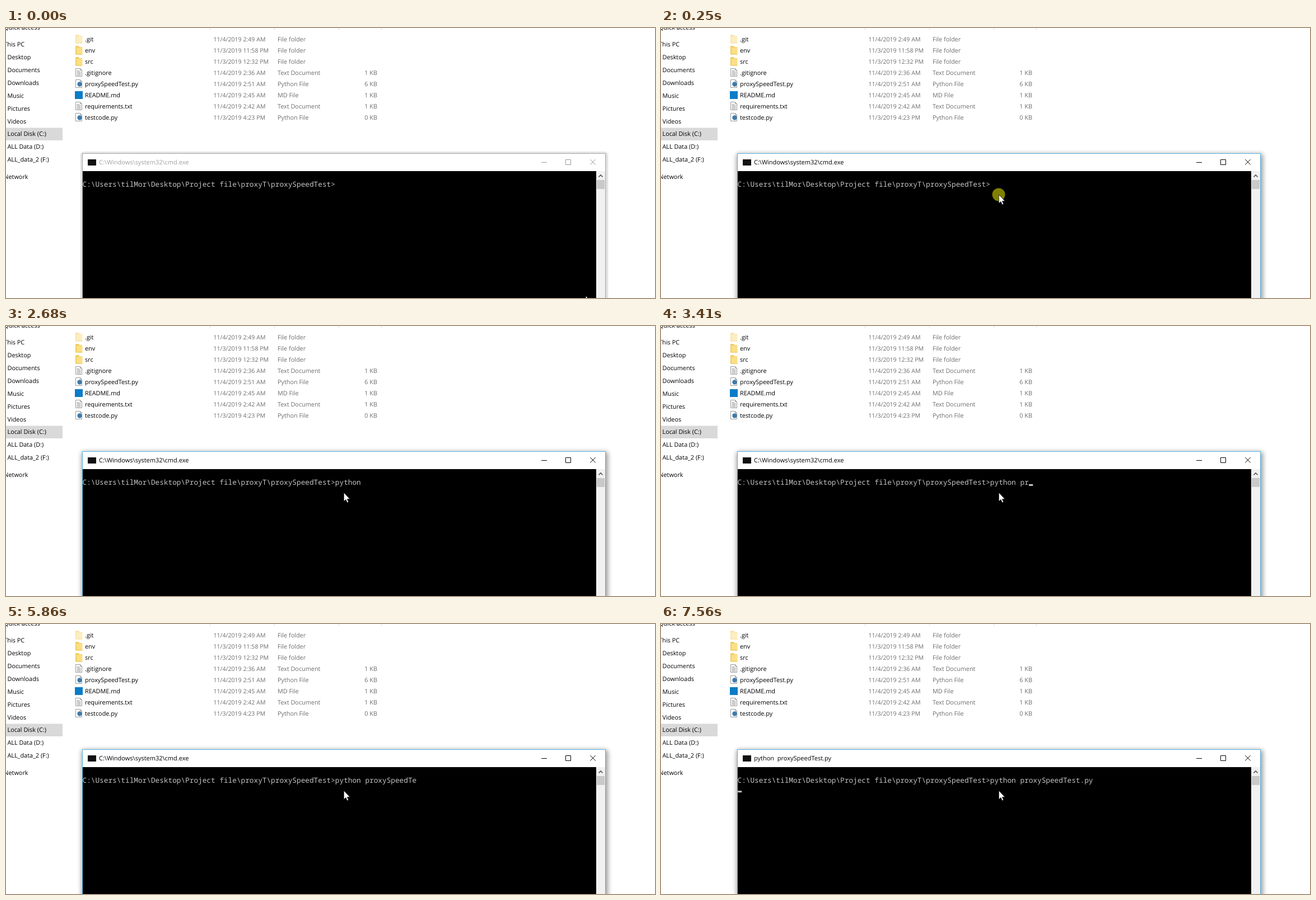
Recreate the animation shown at these times as an HTML page. Size 1159 px wide and 483 px high, loop 8000 ms.

```html
<!DOCTYPE html>
<html lang="en">
<head>
<meta charset="utf-8">
<title>Command window</title>
<style>
  html, body { margin: 0; width: 100%; height: 100%; overflow: hidden; background: #fff; }
  svg { display: block; }
  text { font: 10.85px "Open Sans", sans-serif; white-space: pre; text-rendering: geometricPrecision; }
  .date { font-size: 10.6px; }
  .title { font-size: 11px; }
  .mono { font: 12.75px "Noto Sans Mono", monospace; fill: #c4c4c4; }
</style>
</head>
<body>
<svg id="stage" width="1159" height="483" viewBox="0 0 1159 483">
  <defs>
    <g id="folder">
      <path d="M0 0H6L7 2H12V15H0Z" fill="#f0cd63"/>
      <path d="M2 3H12.5V15.500H2Z" fill="#fbdf85"/>
      <path d="M0 14.500H12.500V15.500H0Z" fill="#e8c255"/>
    </g>
    <g id="page">
      <path d="M.5 .5H8.500L11.500 3.500V14.500H.5Z" fill="#fff" stroke="#9a9a9a"/>
      <path d="M8.500 .5V3.500H11.500" fill="none" stroke="#9a9a9a"/>
    </g>
    <g id="doc">
      <use href="#page"/>
      <path d="M2.500 4.500H7M2.500 6.500H9.500M2.500 8.500H9.500M2.500 10.500H9.500M2.500 12.500H9.500" stroke="#9c9c9c"/>
    </g>
    <g id="script">
      <use href="#page"/>
      <circle cx="7.500" cy="8.500" r="4.200" fill="#3d7aab"/>
    </g>
    <rect id="note" x="-1" y="1" width="14" height="14" fill="#0a7cc8"/>
  </defs>

  <rect width="1159" height="483" fill="#fff"/>
  <path d="M364.500 0V4M479.500 0V4M594.500 0V4M670.500 0V4" stroke="#e2e2e2"/>
  <rect y="178.500" width="101" height="22.500" fill="#d9d9d9"/>
  <g id="nav"></g>
  <g id="files"></g>

  <rect id="shadow"/>
  <rect id="frame" x="136.500" y="224.500" width="934" height="270" fill="#fff"/>
  <rect x="137" y="256" width="917" height="227" fill="#000"/>
  <rect x="1054" y="256" width="16" height="227" fill="#f1f1f1"/>
  <rect x="1055" y="272" width="14" height="16" fill="#c9c9c9"/>
  <path d="M1058.500 266.500L1062 263L1065.500 266.500" fill="none" stroke="#555" stroke-width="1.600"/>
  <rect x="146" y="235" width="15" height="11" fill="#111"/>
  <text id="title" class="title" x="166" y="244.300"></text>
  <path id="buttons" d="M956 240.500H966M999.500 235.500H1008.500V244.500H999.500ZM1043.200 235L1052.800 244.600M1052.800 235L1043.200 244.600" fill="none"/>

  <text id="line" class="mono" x="136.500" y="283.500"></text>
  <rect id="caret" width="7.400" height="3" fill="#c4c4c4"/>
  <g id="mouse">
    <circle id="halo" r="11.500" fill="#808000"/>
    <path d="M.3 0V15.800L3.900 12.500L6.200 18L8.700 17L6.400 11.700H11.200Z" fill="#fff" stroke="#000" stroke-width=".7"/>
  </g>
</svg>
<script>
const LOOP = 8000;
const PROMPT = 'C:\\Users\\tilMor\\Desktop\\Project file\\proxyT\\proxySpeedTest>';
const COMMAND = 'python proxySpeedTest.py';
const CELL = 12.75 * 0.6;

// Moment each character of the command appears
const KEYS = [1120, 1330, 1450, 1880, 2430, 2680, 2900, 3130, 3240, 3430, 3560, 3720,
  4360, 4560, 4740, 4930, 5120, 5600, 5860, 6110, 6390, 6560, 6720, 6880];
// Blinks that turn the caret on; the next key hides it
const BLINKS = [720, 1250, 1780, 2290, 3350, 3870, 4400, 5440, 5950, 7060];
const ENTER = 7280, ANSWER = 7560, CLICK = 190, RELEASE = 300;
// Pointer stops: time, x, y
const STOPS = [[0, 1035, 479], [30, 940, 438], [80, 790, 374], [140, 655, 319], [CLICK, 603, 298]];

const $ = id => document.getElementById(id);
const set = (el, attrs) => { for (const k in attrs) el.setAttribute(k, attrs[k]); };

function add(parent, tag, attrs, content = '') {
  const el = document.createElementNS('http://www.w3.org/2000/svg', tag);
  set(el, attrs);
  el.textContent = content;
  parent.appendChild(el);
}

function buildNav() {
  const group = (name, y) => add($('nav'), 'text', { x: -3.700, y }, name);
  group('Quick access', 3);
  group('This PC', 33);
  group('Network', 270);
  ['Desktop', 'Documents', 'Downloads', 'Music', 'Pictures', 'Videos',
    'Local Disk (C:)', 'ALL Data (D:)', 'ALL_data_2 (F:)'].forEach((name, i) =>
    add($('nav'), 'text', { x: 2.500, y: 56 + i * 22.900 }, name));
}

function buildFiles() {
  const rows = [
    ['folder', '.git', '11/4/2019 2:49 AM', 'File folder'],
    ['folder', 'env', '11/3/2019 11:58 PM', 'File folder'],
    ['folder', 'src', '11/3/2019 12:32 PM', 'File folder'],
    ['doc', '.gitignore', '11/4/2019 2:36 AM', 'Text Document', '1 KB'],
    ['script', 'proxySpeedTest.py', '11/4/2019 2:51 AM', 'Python File', '6 KB'],
    ['note', 'README.md', '11/4/2019 2:45 AM', 'MD File', '1 KB'],
    ['doc', 'requirements.txt', '11/4/2019 2:42 AM', 'Text Document', '1 KB'],
    ['script', 'testcode.py', '11/3/2019 4:23 PM', 'Python File', '0 KB']
  ];
  const fill = '#6d6d6d';
  rows.forEach(([icon, name, date, type, size = ''], i) => {
    const y = 24 + i * 20, box = $('files');
    add(box, 'use', { href: '#' + icon, x: 124, y: y - 12, opacity: i ? 1 : 0.5 });
    add(box, 'text', { x: 141, y }, name);
    add(box, 'text', { x: 370.500, y, fill, class: 'date' }, date);
    add(box, 'text', { x: 485, y, fill }, type);
    add(box, 'text', { x: 663, y, fill, 'text-anchor': 'end' }, size);
  });
}

const lastBefore = (list, t) => list.reduce((last, v) => v <= t ? v : last, -1);

function draw(t) {
  const active = t >= CLICK;
  set($('frame'), { stroke: active ? '#55b2e6' : '#a9a9a9' });
  set($('buttons'), { stroke: active ? '#000' : '#999' });
  set($('title'), { fill: active ? '#000' : '#a0a0a0' });
  set($('shadow'), active
    ? { x: 135, y: 225, width: 940, height: 280, rx: 4, opacity: 0.38, style: 'filter:blur(4px)' }
    : { x: 133, y: 221.500, width: 942, height: 280, rx: 6, opacity: 0.13, style: 'filter:blur(1px)' });
  $('title').textContent = t < ENTER ? 'C:\\Windows\\system32\\cmd.exe' : 'python  proxySpeedTest.py';

  const typed = KEYS.filter(k => k <= t).length;
  $('line').textContent = PROMPT + COMMAND.slice(0, typed);

  const answered = t >= ANSWER;
  const blinking = t < ENTER && lastBefore(BLINKS, t) > lastBefore(KEYS, t);
  set($('caret'), {
    x: answered ? 136.800 : 136.700 + (PROMPT.length + typed) * CELL,
    y: answered ? 298.300 : 283,
    visibility: answered || blinking ? 'visible' : 'hidden'
  });

  const [, x, y] = STOPS.filter(s => s[0] <= t).pop();
  set($('mouse'), { transform: `translate(${x} ${y})` });
  set($('halo'), { visibility: active && t < RELEASE ? 'visible' : 'hidden' });
}

buildNav();
buildFiles();
const start = performance.now();
function tick() {
  draw((performance.now() - start) % LOOP);
  requestAnimationFrame(tick);
}
tick();
</script>
</body>
</html>
```
